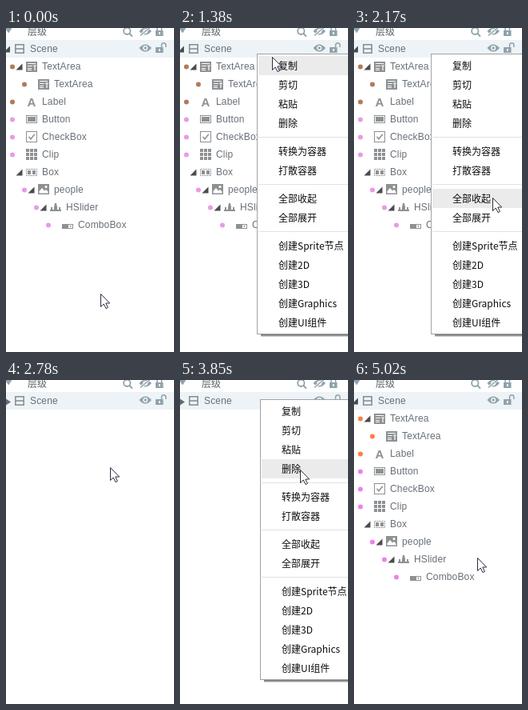
Recreate the animation shown at these times as an HTML page. Size 210 by 405 pixels, loop 5.32 s.

```html
<!DOCTYPE html>
<html lang="zh">
<head>
<meta charset="utf-8">
<title>Hierarchy panel</title>
<style>
html, body { margin: 0; width: 100%; height: 100%; overflow: hidden; background: #fff; }
svg { display: block; width: 210px; height: 405px; }
text { white-space: pre; }
.row { font: 12px "Liberation Sans", Arial, sans-serif; letter-spacing: .15px; fill: #687078; }
.cjk { font: 12px "Noto Sans CJK SC", "Noto Sans CJK", sans-serif; fill: #0c0c0c; }
</style>
</head>
<body>
<svg id="stage" viewBox="0 0 210 405" xmlns="http://www.w3.org/2000/svg">
  <defs>
    <linearGradient id="shade" x2="0" y2="1">
      <stop offset="0" stop-color="#6c6c6c"/>
      <stop offset=".5" stop-color="#a8a8a8"/>
      <stop offset="1" stop-color="#fff" stop-opacity="0"/>
    </linearGradient>
  </defs>
  <rect y="15" width="210" height="22" fill="#edf3f6"/>
  <g id="header"></g>
  <g id="scene"></g>
  <g id="tree"></g>
  <g id="menu">
    <rect x="101" y="383" width="120" height="4" fill="url(#shade)"/>
    <rect x="96.5" y="32.5" width="140" height="350" fill="#fff" stroke="#a3a3a3"/>
    <rect id="hover" x="98" width="120" height="24" fill="#ebebeb"/>
    <g id="items"></g>
  </g>
  <path id="cursor" d="M.5.5V16.5L4.2 13 7 18.6 9.4 17.5 6.8 12H11.7Z" fill="#fff" stroke="#2b3042" stroke-linejoin="round"/>
</svg>
<script>
const LOOP = 5320;
const GRAY = '#8d9194', TOOL = '#8fa3ac', DARK = '#4c4c4c';
const $ = id => document.getElementById(id);

const box = (x, y, w, h, fill = GRAY) => `<rect x="${x}" y="${y}" width="${w}" height="${h}" fill="${fill}"/>`;
const frame = (x, y, w, h, lw = 1) =>
  `<rect x="${x + lw / 2}" y="${y + lw / 2}" width="${w - lw}" height="${h - lw}" fill="none" stroke="${GRAY}" stroke-width="${lw}"/>`;
const fillPath = (d, fill = GRAY) => `<path d="${d}" fill="${fill}"/>`;
const line = (d, color = GRAY, lw = 1.5) => `<path d="${d}" fill="none" stroke="${color}" stroke-width="${lw}"/>`;
const label = (x, y, s, cls = 'row') => `<text class="${cls}" x="${x}" y="${y}">${s}</text>`;
const openArrow = (right, y) => fillPath(`M${right} ${y - 4}V${y + 4}H${right - 8}Z`, DARK);

// Icons are drawn in a 14px wide cell centred on y = 0.
const icons = {
  area: () => box(0, -6, 14, 13) + box(2, -4, 10, 1, '#fff') + box(2, -1, 6, 1, '#fff') +
    box(2, 2, 5, 1, '#fff') + box(2, 4, 5, 1, '#fff') + line('M9 -1H13M11 -1V5', '#fff', 1.2),
  label: () => `<text x="1.6" y="6" font-family="Liberation Sans, Arial, sans-serif" font-weight="bold" font-size="15" fill="${GRAY}">A</text>`,
  button: () => frame(0, -5, 14, 10) + box(2, -3, 10, 6),
  check: () => frame(0, -7, 14, 14) + line('M3.5 0L6 2.8 10.8 -3.2'),
  clip: () => Array.from({ length: 9 }, (_, i) => box(i % 3 * 5, -7 + Math.floor(i / 3) * 5, 4, 4)).join(''),
  box: () => `<rect x=".5" y="-3.5" width="13" height="8" fill="none" stroke="${GRAY}" stroke-dasharray="2 1"/>` +
    box(2, -2, 4, 5) + box(8, -2, 4, 5),
  image: () => box(0, -7, 14, 13) + fillPath('M1.5 4.5V2L5 -2 8 1.5 10 0 12.5 2.5V4.5Z', '#fff') +
    '<circle cx="10" cy="-3.5" r="1.5" fill="#fff"/>',
  slider: () => box(0, 3, 14, 2) + box(1, 0, 2, 3) + box(11, 0, 2, 3) + fillPath('M5 3V0L6 -5H8L9 0V3Z'),
  combo: () => box(0, -1, 7, 6) + frame(7, -1, 7, 6) + fillPath('M9 1H12L10.5 3Z')
};

const eye = y => `<path d="M166.5 ${y}Q174 ${y - 9} 182 ${y}Q174 ${y + 9} 166.5 ${y}Z" fill="${TOOL}"/>` +
  `<circle cx="174.2" cy="${y}" r="3" fill="#fff"/><circle cx="174.2" cy="${y}" r="1.7" fill="${TOOL}"/>`;
const lockBody = y => box(187, y, 9.5, 7, TOOL) + box(191, y + 2, 1.6, 3, '#fff');

$('header').innerHTML =
  fillPath('M-1 0H7.5L3.2 6.5Z', TOOL) +
  `<text class="cjk" x="27" y="8.5" style="fill:#59626a">层级</text>` +
  `<circle cx="151.3" cy="3.8" r="4.2" fill="none" stroke="${TOOL}" stroke-width="1.8"/>` +
  line('M154.4 7L158 10.6', TOOL, 2) +
  eye(4) + line('M168 9.5L181 -1.5', '#fff', 3) + line('M168 9.5L181 -1.5', TOOL, 1.4) +
  lockBody(3) + line('M189 3V1Q189 -2 191.7 -2T194.5 1V3', TOOL);

$('scene').innerHTML =
  `<g id="opened">${fillPath('M5 22.5V30.5H-3Z', DARK)}</g>` +
  `<g id="closed">${fillPath('M0 23.5L6 27.5 0 31.5Z', '#6a6a6a')}</g>` +
  frame(11, 20, 12, 12, 1.6) + line('M11 26H23', GRAY, 1.6) +
  label(30, 30, 'Scene') + eye(25) + lockBody(24) +
  line('M194.5 24V21.5Q194.5 18.7 197.2 18.7T199.9 21.5V24', TOOL);

// [name, icon, depth, dot kind, has children]
const rows = [
  ['TextArea', 'area', 0, 'warm', 1], ['TextArea', 'area', 1, 'warm'], ['Label', 'label', 0, 'warm'],
  ['Button', 'button', 0, 'pink'], ['CheckBox', 'check', 0, 'pink'], ['Clip', 'clip', 0, 'pink'],
  ['Box', 'box', 0, '', 1], ['people', 'image', 1, 'pink', 1], ['HSlider', 'slider', 2, 'pink', 1],
  ['ComboBox', 'combo', 3, 'pink']
];
$('tree').innerHTML = rows.map(([name, icon, depth, dot, parent], i) => {
  const y = 48 + i * 22, x = depth * 15;
  return (dot ? `<circle class="${dot}" cx="${x + 8}" cy="${y + .5}" r="3"/>` : '') +
    (parent ? openArrow(x + 20.5, y + .5) : '') +
    `<g transform="translate(${x + 25} ${y})">${icons[icon]()}</g>` + label(x + 45, y + 4, name);
}).join('');

const groups = [
  ['复制', '剪切', '粘贴', '删除'], ['转换为容器', '打散容器'], ['全部收起', '全部展开'],
  ['创建Sprite节点', '创建2D', '创建3D', '创建Graphics', '创建UI组件']
];
const centers = [];
let itemY = 47, items = '';
groups.forEach((group, g) => {
  if (g) {
    items += box(98, itemY - 18, 120, 1, '#e2e2e2');
  }
  group.forEach(s => {
    items += label(123, itemY + 5, s, 'cjk');
    centers.push(itemY);
    itemY += 24;
  });
  itemY += 11;
});
$('items').innerHTML = items;

// [time, x, y, steps taken since the previous stop]
const stops = [
  [0, 118, 332, 1], [530, 91, 80, 7], [840, 96, 32, 4], [1150, 96, 32, 1], [1380, 115, 36, 3],
  [1680, 166, 168, 4], [2170, 173, 212, 6], [2405, 173, 212, 1], [2780, 130, 109, 5],
  [3010, 102, 46, 3], [3170, 100, 24, 2], [3550, 100, 24, 1], [3850, 150, 112, 4],
  [4020, 157, 160, 2], [4460, 154, 222, 6], [LOOP, 154, 222, 1]
];
function pointer(t) {
  const i = Math.max(1, stops.findIndex(s => s[0] > t));
  const [t0, x0, y0] = stops[i - 1], [t1, x1, y1, n] = stops[i];
  const p = Math.floor((t - t0) / (t1 - t0) * n) / n;
  return [Math.round(x0 + (x1 - x0) * p), Math.round(y0 + (y1 - y0) * p)];
}

const show = (id, on) => $(id).setAttribute('visibility', on ? 'visible' : 'hidden');
const paint = (cls, color) => document.querySelectorAll('.' + cls).forEach(e => e.setAttribute('fill', color));

function draw(t) {
  const [x, y] = pointer(t);
  $('cursor').setAttribute('transform', `translate(${x} ${y})`);

  const collapsed = t >= 2480 && t < 4860;
  show('tree', !collapsed);
  show('opened', !collapsed);
  show('closed', collapsed);
  paint('warm', t < 2480 ? '#b27a5c' : '#ff7f41');
  paint('pink', t < 2480 ? '#e89be6' : '#ee82ee');

  const second = t >= 3550;
  const menuOn = (t >= 1150 && t < 2480) || (second && t < 4860);
  const dy = second ? -8 : 0;
  show('menu', menuOn);
  $('menu').setAttribute('transform', `translate(${second ? 4 : 0} ${dy})`);
  const hit = centers.find(c => y - dy >= c - 12 && y - dy < c + 12);
  show('hover', menuOn && hit !== undefined);
  if (hit !== undefined) $('hover').setAttribute('y', hit - 12);
}

const start = performance.now();
function tick() {
  draw((performance.now() - start) % LOOP);
  requestAnimationFrame(tick);
}
tick();
</script>
</body>
</html>
```
